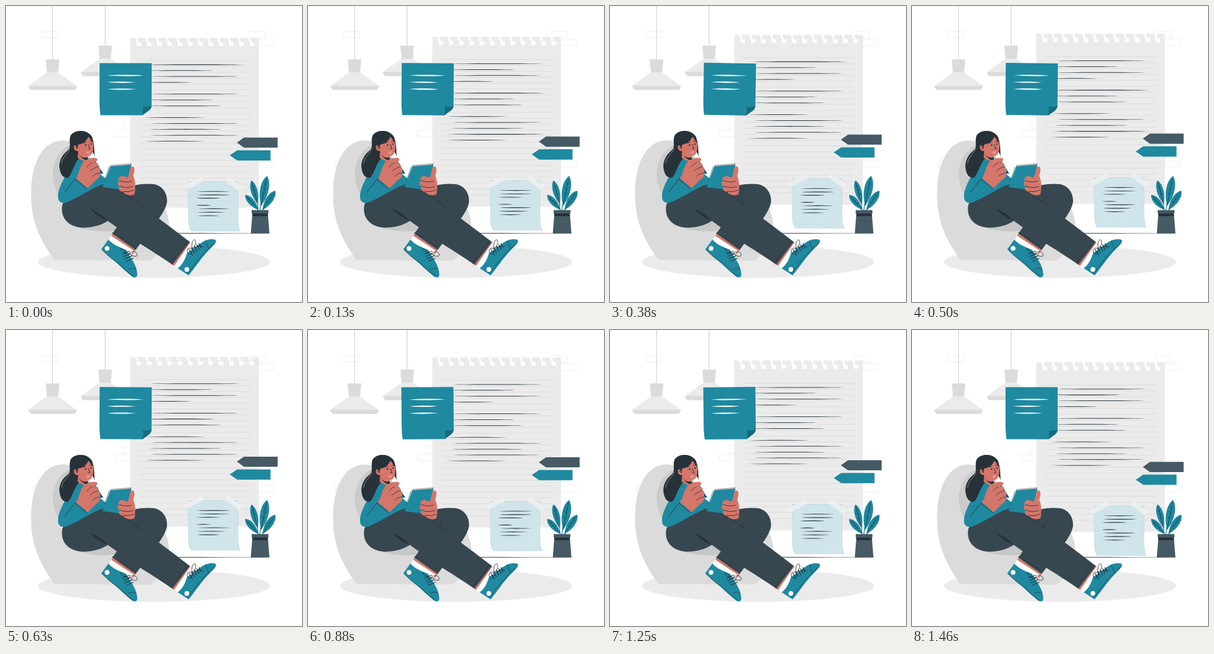
An HTML page with a canvas for the animation above (1500 ms loop, 500 by 500 pixels).

```html
<!DOCTYPE html>
<html lang="en">
<head>
<meta charset="utf-8">
<title>Notes</title>
<style>
html, body { margin: 0; width: 100%; height: 100%; overflow: hidden; background: #fff; }
canvas { display: block; width: 500px; height: 500px; }
</style>
</head>
<body>
<canvas id="stage"></canvas>
<script>
const canvas = document.getElementById('stage');
const ratio = window.devicePixelRatio || 1;
canvas.width = canvas.height = 500 * ratio;
const ctx = canvas.getContext('2d');

const TEAL = '#1f89a0', DEEP = '#186a7c', SLATE = '#455a64', DARK = '#37474f',
  INK = '#263238', SKIN = '#d4766a', PALE = '#ebebeb', GREY = '#dbdbdb', WHITE = '#fff';
const LOOP = 1500, STEPS = 36;

function fill(d, color) {
  ctx.fillStyle = color;
  ctx.fill(new Path2D(d));
}

function stroke(d, color = INK, width = 0.8) {
  ctx.strokeStyle = color;
  ctx.lineWidth = width;
  ctx.lineCap = ctx.lineJoin = 'round';
  ctx.stroke(new Path2D(d));
}

function dot(x, y, r, color) {
  ctx.fillStyle = color;
  ctx.beginPath();
  ctx.arc(x, y, r, 0, Math.PI * 2);
  ctx.fill();
}

// Pen line, thick in the middle and pointed at both ends
function penLine(x0, x1, y, h, color = INK) {
  const a = x0 + (x1 - x0) * 0.3, b = x0 + (x1 - x0) * 0.7, k = h * 0.66;
  fill(`M${x0} ${y}C${a} ${y - k} ${b} ${y - k} ${x1} ${y}C${b} ${y + k} ${a} ${y + k} ${x0} ${y}Z`, color);
}

function lamp(x, y) {
  ctx.save();
  ctx.translate(x, y);
  stroke(`M0 ${-y}V0`, '#d0d0d0', 1.1);
  fill('M-9.5 22H9.5L41.5 45H-41.5Z', PALE);
  fill('M-11.5 0H11.5L9.5 22H-9.5Z', GREY);
  fill('M-41.5 44.5H41.5L38 51.5H-37.5Z', GREY);
  ctx.restore();
}

function background() {
  ctx.fillStyle = WHITE;
  ctx.fillRect(0, 0, 500, 500);
  const bricks = [[61, 43], [412, 43], [427, 57], [200, 196], [185, 210], [46, 262], [427, 262]];
  for (const [x, y] of bricks) stroke(`M${x} ${y}h26v11h-26Z`, '#efefef', 1);
  lamp(78.6, 90.3);
  lamp(167.5, 66.9);
}

function paper() {
  fill('M210 54.3H427.3V341.2H210Z', PALE);
  for (let i = 0; i < 12; i++) {
    const x = 220.8 + i * 17.35;
    fill(`M${x - 3} 53.5H${x + 1}L${x + 3} 61.8H${x + 7.4}V68.4H${x}V62.2Q${x - 1.5} 59 ${x - 3} 53.5Z`, WHITE);
  }
  for (let i = 0; i < 24; i++) {
    const y = 92.8 + i * 9.93;
    stroke(`M226 ${y}H412`, '#dadada', 0.8);
  }
  const ends = [405, 357, 403, 315, 0, 404, 357, 372, 0, 337, 404, 373, 403, 336];
  ends.forEach((end, i) => {
    if (end) penLine(234, end, 99.7 + i * 9.93, 1.05);
  });
}

function tags() {
  fill('M390 231.2L402 222.8H458.8V239.9H402Z', SLATE);
  fill('M378 252.9L390.5 244.3H446.8V261.6H390.5Z', TEAL);
}

function clearNote() {
  const sheet = 'M308.3 297.3H391.7V360Q392 375 395.7 380.7H313Q308 374 308.3 360Z';
  fill(sheet, '#d1e6eb');
  for (let i = 1; i < 16; i++) {
    const d = i * 5.2;
    stroke(`M${308.3 + d} 297.5V380.5M308.5 ${297.3 + d}H391.6`, '#c8e0e6', 0.5);
  }
  stroke(sheet, '#a6d0d9', 0.6);
  ctx.globalAlpha = 0.85;
  fill('M301 303.5L331 288.2L335 295.5L305.5 311Z', '#f0f0f0');
  fill('M374 288L399.5 306.5L395 314.5L369.5 295.5Z', '#f0f0f0');
  ctx.globalAlpha = 1;
  const rows = [[322, 379, 313.8], [323, 379, 319.7], [321, 363, 325.2], [321, 346, 337.2],
    [324, 378, 342.9], [322, 371, 348.9], [323, 361, 354.8]];
  for (const [x0, x1, y] of rows) penLine(x0, x1, y, 1.2);
}

function sticky() {
  fill('M158 96.5H246V169L231 184.5H159.7Q158 175 158 160Z', TEAL);
  fill('M230.5 184.5Q232.5 177 231.5 169.5Q240 171 246 168.3Q246 173 241 177Z', DEEP);
  penLine(171, 232, 117.4, 2.1, WHITE);
  penLine(171, 219, 128.8, 2.2, WHITE);
  penLine(171, 220, 140.5, 2.2, WHITE);
}

function floor() {
  penLine(49, 452, 384, 1.1);
  ctx.fillStyle = PALE;
  ctx.beginPath();
  ctx.ellipse(250, 432, 196, 27, 0, 0, Math.PI * 2);
  ctx.fill();
}

function chair() {
  fill('M82 429C58 396 42 364 42.3 317C42.5 262 63 227 97 227C118 228 136 246 148 270C185 318 255 305 270 345C278 365 277 382 272 392C266 408 258 420 244 430Z', GREY);
  fill('M118 233C97 234 79 258 79 284C79.5 304 86 318 98 330L150 300L140 245Z', '#cbcbcb');
  fill('M104 362C122 380 158 383 190 379L176 352Z', '#c7c7c7');
}

function leftShoe() {
  fill('M180 385L220 411L213 420L174 394Z', SKIN);
  fill('M177.5 388L215.5 413L209 423L171 399Z', WHITE);
  fill('M161 411L173 394.5C180 403 191 407 203 412C210 425 222 438 221.8 454C221.5 459 217 459.5 213 457C203 449 195 441 187 434Q174 424 161 411Z', TEAL);
  stroke('M162 411C170 421 181 428 190 435C199 442 205 451 215 456M207 445Q213 441 219 444', INK, 0.7);
  stroke('M197 419L209 414M199 423L211 418M201 427L213 422M204 431L215 426', INK, 1.2);
  stroke('M204 417C192 404 191 412 199 416C205 419 209 421 207 418C214 412 224 416 221 422C217 425 211 420 207 418', INK, 0.9);
  dot(170.7, 409.6, 4, WHITE);
}

function rightShoe() {
  fill('M307 396L313 401L286 440L279 436Z', SKIN);
  fill('M311 400L319 408L295 446L284 439Z', WHITE);
  fill('M290 443C300 436 303 425 306 417C318 410 326 401 337 396C344 393.5 351 393.5 354.5 395.5C356 400 349 406 344 411C330 425 321 440 308.5 455Z', TEAL);
  stroke('M306 452C318 438 327 424 342 410L354 399M337 397Q339 404 342 409', INK, 0.7);
  stroke('M309 411L315 421M314 408L318 417M318 405L322 414M322 403L326 411M326 401L329 408', INK, 1.2);
  stroke('M314 410C305 405 304 417 309 419C314 420 315 413 314 410C313 399 317 392 320 396C322 402 318 407 314 410C323 405 330 405 333 407', INK, 0.9);
  dot(305.5, 445, 4, WHITE);
}

function legs() {
  leftShoe();
  rightShoe();
  fill('M190 315C207 302 232 299 250 301C267 304 273 320 272 331C270 346 254 365 242 381C233 392 226 403 219 412L179 384C188 376 190 366 196 355Z', DARK);
  stroke('M183 384L218 407', INK, 0.7);
  fill('M97 332C120 320 139 302 164 301C182 301 193 311 206 320.5C240 345 275 371 310.5 398.5L281 437C250 415 212 394 186 373L172 363C160 371 144 374.5 130 374.5C112 374 95.5 364 94.5 345Q94 337 97 332Z', DARK);
  fill('M142 342C154 348 163 353 172 363C162 359 150 352 142 342Z', INK);
  stroke('M200 316.5L235 342', INK, 0.7);
  stroke('M306 398L279 433M226 334C220 331 222 326 229 321', INK, 0.7);
}

function torso() {
  fill('M121 256C112 263 109 276 98 291C92 303 87 314 88 324C89 333 97 334 104 331C122 324 142 309 164 301L169 292C162 278 154 266 149 259Z', TEAL);
  stroke('M118 291C110 300 104 308 99 315M117 293L137 309', INK, 0.9);
  stroke('M150 262C153 270 159 279 166 286', INK, 1.6);
}

function head() {
  fill('M109 219C105 231 112 238 103 245C93 253 88 266 91 277C93 287 98 291 105 290C112 283 114 268 123 258L136 250L145 245C149 250 150 254 151 259C148 250 151 238 146 223C142 210 117 206 109 219Z', INK);
  stroke('M108 240C105 250 95 254 94 266', '#aeb8bc', 0.7);
  fill('M122 244L137 251L140 264C130 262 124 259 121 256Z', SKIN);
  fill('M123 250Q130 259 138 255L139 262Q128 259 123 250Z', INK);
  fill('M119 234C120 222 136 217 144 222C149 230 149 244 144 251C138 256 128 252 122 245C115 246 112 237 117 234Z', SKIN);
  fill('M109 231C106 219 117 210 128 211C140 212 146 220 147 232C143 226 141 222 139 221C136 229 129 233 122 234C121 238 121 241 120 242C120 236 116 233 113 237Z', INK);
  stroke('M130 232L135 230M141 229L146 228M139 234L142 241L139 241M117 238L120 241', INK, 1);
  dot(134.5, 235, 1.3, INK);
  dot(143.7, 233.2, 1.2, INK);
  fill('M135 247Q138 244 142 245.5Q142 249 139 250Q136 250 135 247Z', '#ee8f91');
}

function writingHand() {
  fill('M118 291C124 284 124 270 132 262C139 257 150 255 154 258C156 261 151 264 146 265C152 263 158 266 156 271C161 274 160 279 158 282C161 287 157 291 152 294C148 298 144 302 138 308Z', SKIN);
  stroke('M146 265C142 266 139 269 137 272M156 271Q147 274 142 279M158 282Q150 283 146 288', INK, 0.8);
  fill('M159 284L167 282L168 291Z', WHITE);
}

function notebook() {
  fill('M176 271L212 268L202 311L163 306Z', TEAL);
  stroke('M174 272L163 306', DEEP, 0.8);
  for (let i = 0; i < 12; i++) {
    const x = 177 + i * 3;
    stroke(`M${x} ${271.4 - i * 0.25}q-1 -3 1.2 -2.6`, INK, 0.8);
  }
  fill('M205 290C210 284 207 273 213 271C219 271 217 279 215 287C219 295 219 309 217 318C211 321 202 320 198 314C191 313 189 308 192 305C187 302 188 297 191 296C188 291 192 287 197 287Z', SKIN);
  stroke('M192 295Q201 299 212 296M192 304Q202 309 214 305M198 313Q207 315 216 311', INK, 0.9);
}

function leaf(x0, y0, x1, y1, width) {
  const dx = x1 - x0, dy = y1 - y0, len = Math.hypot(dx, dy);
  const px = -dy / len * width, py = dx / len * width;
  const at = (t, side) => `${x0 + dx * t + px * side} ${y0 + dy * t + py * side}`;
  fill(`M${at(0, 0)}C${at(0.35, 1)} ${at(0.8, 1)} ${at(1, 0)}C${at(0.8, -1)} ${at(0.35, -1)} ${at(0, 0)}Z`, TEAL);
  stroke(`M${at(0, 0)}L${at(0.9, 0)}`, INK, 0.8);
  for (const t of [0.35, 0.52, 0.68]) {
    stroke(`M${at(t + 0.1, 0.35)}L${at(t, 0)}L${at(t + 0.1, -0.35)}`, INK, 0.4);
  }
}

function plant() {
  stroke('M426 346L424 325M428.5 346Q430 335 432 325M433 346L437 339', TEAL, 1.3);
  leaf(425, 334, 414.5, 294.5, 7.5);
  leaf(431, 337, 441, 287, 9.5);
  leaf(426, 344, 404, 319, 7);
  leaf(433.5, 344, 455, 312, 8);
  fill('M416 353H442.5L445 384.3H413.5Z', SLATE);
  fill('M416 350H442.3V355H416Z', INK);
  fill('M415 344.7H443.3V350.5H415Z', SLATE);
}

function draw(now) {
  // The motion advances in even steps, 24 a second
  const step = Math.floor((now % LOOP) / LOOP * STEPS + 0.01) + 1;
  const t = (step % STEPS) / STEPS;
  const lift = -10 * (1 - Math.abs(1 - 2 * t));
  // Degrees: 0, up to 1 at a quarter, down to -1 at three quarters
  const sway = t < 0.25 ? 4 * t : t < 0.75 ? 2 - 4 * t : 4 * t - 4;

  ctx.setTransform(ratio, 0, 0, ratio, 0, 0);
  background();
  floor();

  ctx.save();
  ctx.translate(0, lift);
  paper();
  tags();
  clearNote();
  ctx.restore();

  ctx.save();
  ctx.translate(202, 140.5);
  ctx.rotate(sway * Math.PI / 180);
  ctx.translate(-202, -140.5);
  sticky();
  ctx.restore();

  chair();
  legs();
  torso();
  head();
  notebook();
  writingHand();
  plant();
}

const start = performance.now();
function tick() {
  draw(performance.now() - start);
  requestAnimationFrame(tick);
}
tick();
</script>
</body>
</html>
```
